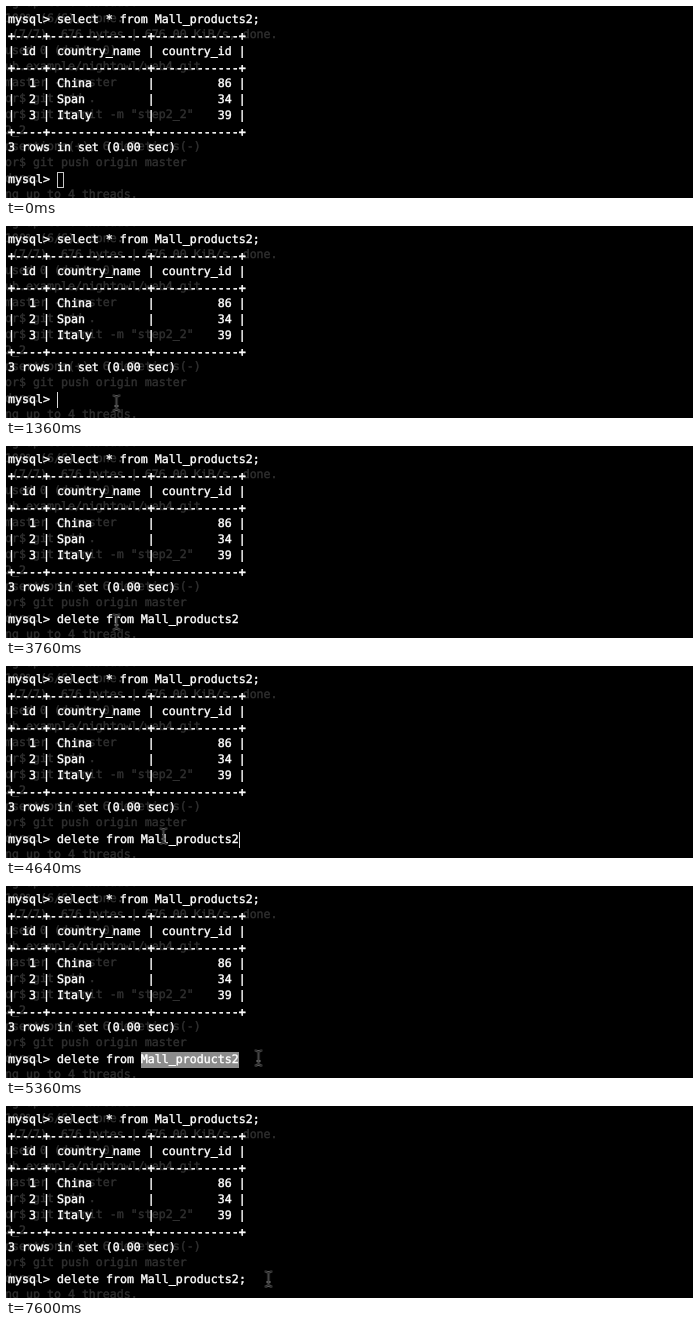
Recreate the animation shown at these times as an HTML page. Size 687x192 px, loop 8000 ms.

```html
<!DOCTYPE html>
<html lang="en">
<head>
<meta charset="utf-8">
<title>Terminal session</title>
<style>
  html, body { margin: 0; width: 100%; height: 100%; overflow: hidden; background: #000; }
  svg { display: block; width: 687px; height: 192px; }
  text {
    font: 11.627px "DejaVu Sans Mono", monospace; /* 7px per character */
    white-space: pre;
    text-rendering: geometricPrecision;
    fill: #fff;
    stroke: #fff;
    stroke-width: .4px;
  }
  .rule { stroke-width: .6px; }
  .behind text { fill: #303030; stroke: #303030; }

  /* 1% of the loop is 80ms */
  .idle, .bar, .command, .semicolon, .selection, .arrow, .beam {
    animation: 8s step-end infinite;
  }
  .idle { animation-name: idle; }
  .bar { animation-name: bar; }
  .command { animation-name: command; }
  .semicolon { animation-name: semicolon; }
  .selection { animation-name: selection; }
  .arrow { animation-name: arrow; }
  .beam { animation-name: beam; }

  @keyframes idle { 0% { opacity: 1 } 17%, 100% { opacity: 0 } }
  @keyframes command { 0% { opacity: 0 } 35%, 100% { opacity: 1 } }
  @keyframes semicolon { 0% { opacity: 0 } 85%, 100% { opacity: 1 } }
  @keyframes selection { 0% { opacity: 0 } 63% { opacity: 1 } 71%, 100% { opacity: 0 } }
  @keyframes bar {
    0%  { opacity: 0; transform: translateX(51px) }
    17% { opacity: 1; transform: translateX(51px) }
    23% { opacity: 0; transform: translateX(51px) }
    29% { opacity: 1; transform: translateX(51px) }
    35% { opacity: 1; transform: translateX(233px) }
    47% { opacity: 0; transform: translateX(233px) }
    53% { opacity: 1; transform: translateX(233px) }
    59% { opacity: 0; transform: translateX(233px) }
    71% { opacity: 1; transform: translateX(233px) }
    77% { opacity: 0; transform: translateX(233px) }
    83% { opacity: 1; transform: translateX(233px) }
    85% { opacity: 1; transform: translateX(240px) }
    95%, 100% { opacity: 0; transform: translateX(240px) }
  }
  @keyframes arrow {
    0%  { opacity: 0; transform: translate(217px, 190px) }
    3%  { opacity: 1; transform: translate(217px, 190px); animation-timing-function: steps(3) }
    6%  { opacity: 1; transform: translate(153px, 185px); animation-timing-function: steps(3) }
    9%  { opacity: 1; transform: translate(121px, 179px); animation-timing-function: steps(3) }
    12% { opacity: 1; transform: translate(111px, 171px) }
    17%, 100% { opacity: 0; transform: translate(111px, 171px) }
  }
  @keyframes beam {
    0%  { opacity: 0; transform: translate(110.5px, 177px) }
    17% { opacity: 1; transform: translate(110.5px, 177px) }
    20% { opacity: 1; transform: translate(110.5px, 176px) }
    50% { opacity: 1; transform: translate(113.5px, 176px); animation-timing-function: steps(8) }
    58% { opacity: 1; transform: translate(157.5px, 170px); animation-timing-function: steps(2) }
    60% { opacity: 1; transform: translate(164.5px, 174px) }
    61% { opacity: 1; transform: translate(165.5px, 175px) }
    63% { opacity: 1; transform: translate(168.5px, 175px); animation-timing-function: steps(4) }
    67% { opacity: 1; transform: translate(252.5px, 172px); animation-timing-function: steps(2) }
    69% { opacity: 1; transform: translate(275.5px, 172px); animation-timing-function: steps(2) }
    71%, 100% { opacity: 1; transform: translate(262.5px, 173px) }
  }
</style>
</head>
<body>
<svg viewBox="0 0 687 192">
  <!-- faint window showing through the terminal -->
  <g class="behind">
    <text x="-1" y="0">ng up to 4 threads.</text>
    <text x="-1" y="16">100% (6/6), done.</text>
    <text x="-1" y="32"> (7/7), 676 bytes | 676.00 KiB/s, done.</text>
    <text x="-1" y="48">used 0 (delta 0)</text>
    <text x="-1" y="64">ub.example/nightowl/web4.git</text>
    <text x="-1" y="80">master -&gt; master</text>
    <text x="-1" y="96">or$ git add .</text>
    <text x="-1" y="112">or$ git commit -m "step2_2"</text>
    <text x="-1" y="128">2_2</text>
    <text x="-1" y="144">nsertions(+), 6 deletions(-)</text>
    <text x="-1" y="160">or$ git push origin master</text>
    <text x="-1" y="176">done.</text>
    <text x="-1" y="192">ng up to 4 threads.</text>
  </g>

  <rect class="selection" x="135" y="166" width="98" height="16" fill="#8c8c8c"/>

  <text x="2" y="17">mysql&gt; select * from Mall_products2;</text>
  <text class="rule" x="2" y="34">+----+--------------+------------+</text>
  <text x="2" y="49">| id | country_name | country_id |</text>
  <text class="rule" x="2" y="66">+----+--------------+------------+</text>
  <text x="2" y="81">|  1 | China        |         86 |</text>
  <text x="2" y="97">|  2 | Span         |         34 |</text>
  <text x="2" y="113">|  3 | Italy        |         39 |</text>
  <text class="rule" x="2" y="130">+----+--------------+------------+</text>
  <text x="2" y="145">3 rows in set (0.00 sec)</text>
  <text x="2" y="177">mysql&gt;</text>
  <text class="command" x="51" y="177">delete from Mall_products2</text>
  <text class="semicolon" x="233" y="177">;</text>

  <rect class="idle" x="51.5" y="166.5" width="6" height="15" fill="none" stroke="#c8c8c8"/>
  <rect class="bar" y="166" width="1" height="16" fill="#d8d8d8"/>

  <path class="arrow" d="M.5 .5V14.5L3.8 11.4L6 16.3L8.4 15.2L6.2 10.5H10.6Z" fill="#000" stroke="#ddd"/>
  <g class="beam" fill="none">
    <path d="M-3.5 -7.5Q-.5 -7.5 0 -5.5Q.5 -7.5 3.5 -7.5M0 -5.5V5.5M-3.5 7.5Q-.5 7.5 0 5.5Q.5 7.5 3.5 7.5M-2 3H2" stroke="#707070" stroke-width="2.2"/>
    <path d="M-3 -7.5Q-.5 -7.5 0 -5.5Q.5 -7.5 3 -7.5M0 -5.5V5.5M-3 7.5Q-.5 7.5 0 5.5Q.5 7.5 3 7.5" stroke="#111" stroke-width=".9"/>
  </g>
</svg>
</body>
</html>
```
